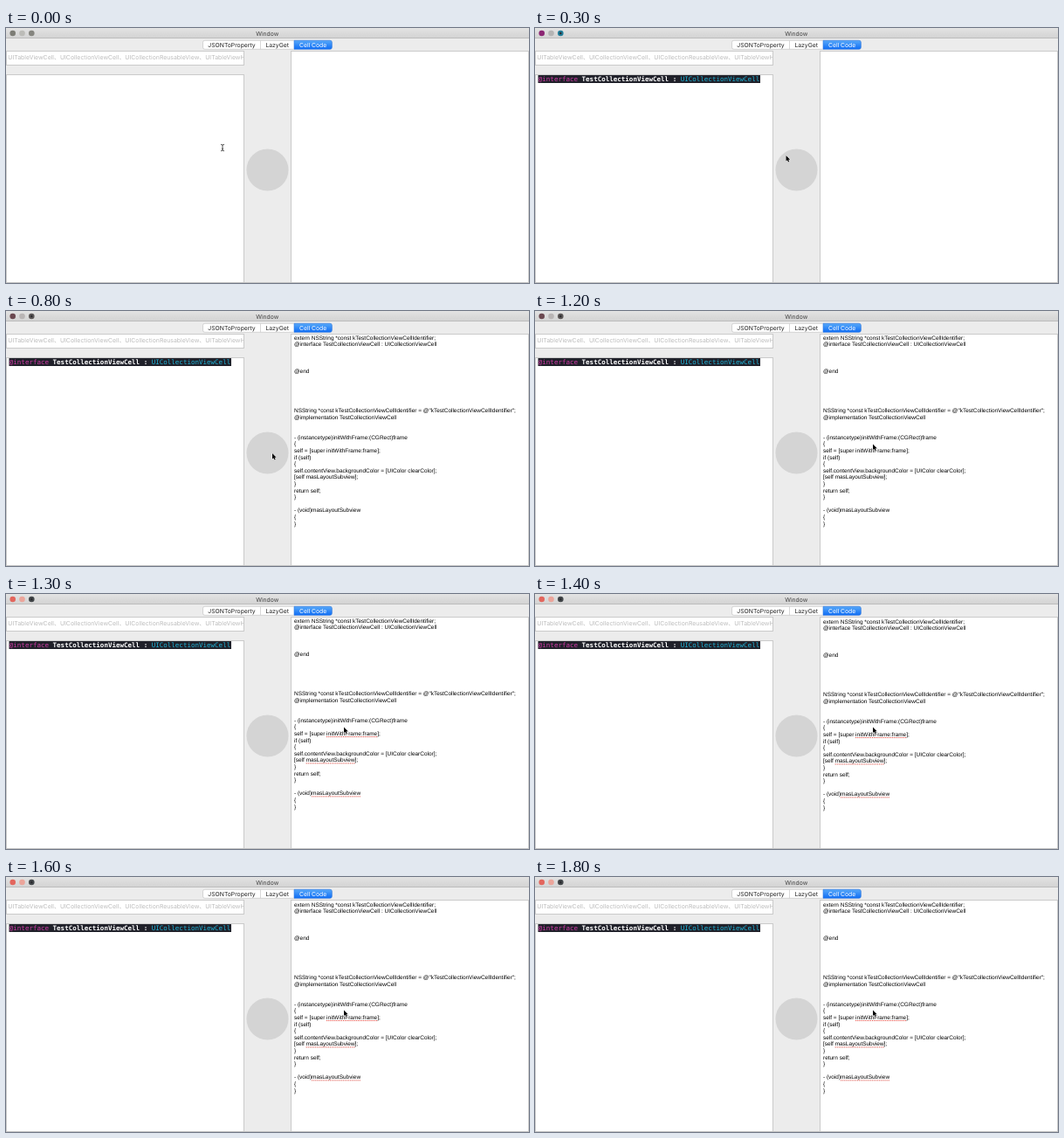
An HTML page with a canvas for the animation above (1.9 s loop, 599 by 292 pixels).

```html
<!DOCTYPE html>
<html>
<head>
<meta charset="utf-8">
<style>
html, body { margin: 0; width: 100%; height: 100%; overflow: hidden; background: #ececec; }
canvas { display: block; }
</style>
</head>
<body>
<canvas id="stage" width="599" height="292"></canvas>
<script>
const ctx = document.getElementById('stage').getContext('2d');
const LOOP = 1900, STEP = 100;
const UI_FAMILY = 'Inter, "Noto Sans CJK SC", sans-serif';
const UI = '6.8px ' + UI_FAMILY;
const HINT = '6.9px ' + UI_FAMILY;
const SANS = '6.46px "Liberation Sans", Arial, sans-serif';
const MONO = '7.53px "DejaVu Sans Mono", monospace';
const LINE = 7.6;
// Moments of the hard changes
const PASTE = 100, ARROW = 200, CONVERT = 700, CHECK = 1300, RELAYOUT = 1400;

const output = `extern NSString *const kTestCollectionViewCellIdentifier;
@interface TestCollectionViewCell : UICollectionViewCell



@end





NSString *const kTestCollectionViewCellIdentifier = @"kTestCollectionViewCellIdentifier";
@implementation TestCollectionViewCell


- (instancetype)initWithFrame:(CGRect)frame
{
self = [super initWithFrame:frame];
if (self)
{
self.contentView.backgroundColor = [UIColor clearColor];
[self masLayoutSubview];
}
return self;
}

- (void)masLayoutSubview
{
}`.split('\n');

const misspelled = ['initWithFrame:frame', 'masLayoutSubview'];

// Pointer tip: time, x, y
const path = [[0, 248, 137], [100, 250, 137], [200, 270, 139], [300, 287.5, 146],
  [400, 299, 157], [500, 305, 163], [800, 305, 163], [900, 323, 161], [1000, 352, 156],
  [1100, 377, 152.5], [1200, 387, 152.5], [1900, 387, 152.5]];

function rect(x, y, w, h, color) {
  ctx.fillStyle = color;
  ctx.fillRect(x, y, w, h);
}

function text(str, x, y, font, color, align = 'left') {
  ctx.font = font;
  ctx.fillStyle = color;
  ctx.textAlign = align;
  ctx.fillText(str, x, y);
}

function circle(x, y, r, color) {
  ctx.fillStyle = color;
  ctx.beginPath();
  ctx.arc(x, y, r, 0, Math.PI * 2);
  ctx.fill();
}

function gradient(y0, y1, from, to) {
  const g = ctx.createLinearGradient(0, y0, 0, y1);
  g.addColorStop(0, from);
  g.addColorStop(1, to);
  return g;
}

function box(x, y, w, h) {
  rect(x, y, w, h, '#cacaca');
  rect(x + 1, y + 1, w - 2, h - 2, '#fff');
}

function roundBox(x, y, w, h, radii, fill, stroke) {
  ctx.beginPath();
  ctx.roundRect(x, y, w, h, radii);
  ctx.fillStyle = fill;
  ctx.fill();
  ctx.strokeStyle = stroke;
  ctx.lineWidth = 0.6;
  ctx.stroke();
}

function drawTitleBar(t) {
  rect(0, 0, 599, 12, gradient(0, 12, '#e3e3e3', '#d2d2d2'));
  rect(0, 11, 599, 1, '#bcbcbc');
  const lights = t < PASTE ? ['#7d7d76', '#bcbcb8', '#85857f']
    : t < CONVERT ? ['#8c2674', '#b4b4b4', '#207c98']
    : t < CHECK ? ['#6b4850', '#b9b5b5', '#5b5656']
    : ['#e3665d', '#eba59b', '#43474a'];
  lights.forEach((color, i) => circle(7.7 + i * 10.8, 6, 3.3, color));
  if (t >= PASTE) circle(29.3, 6, 1.2, '#29292d');
  text('Window', 299.2, 8.6, UI, '#404040', 'center');
}

function drawTabs() {
  roundBox(225.5, 14.3, 147.8, 10, 2.2, '#fff', '#bdbdbd');
  rect(291, 14.5, 0.7, 9.6, '#c8c8c8');
  roundBox(330, 14.3, 43.3, 10, [0, 2.2, 2.2, 0], gradient(14, 24, '#5aabf9', '#126ff5'), '#2a78e4');
  text('JSONToProperty', 258.5, 21.8, UI, '#222', 'center');
  text('LazyGet', 310.7, 21.8, UI, '#222', 'center');
  text('Cell Code', 351.6, 21.8, UI, '#fff', 'center');
}

function drawPanels() {
  box(0, 26, 273, 17);
  box(0, 53, 273, 239);
  box(326, 26, 273, 266);
  ctx.save();
  ctx.beginPath();
  ctx.rect(1, 27, 271, 15);
  ctx.clip();
  text('UITableViewCell、UICollectionViewCell、UICollectionReusableView、UITableViewHeaderFooterView',
    2.3, 35.8, HINT, '#bcbcbc');
  ctx.restore();
  circle(299.5, 162.5, 24, '#d4d4d4');
}

function drawInput() {
  rect(3.5, 54, 254.5, 9, '#20212a');
  let x = 3.8;
  for (const [part, color, weight] of [
    ['@interface ', '#d03aa6', ''],
    ['TestCollectionViewCell : ', '#fff', 'bold '],
    ['UICollectionViewCell', '#1fb6da', '']]) {
    text(part, x, 61, weight + MONO, color);
    x += ctx.measureText(part).width;
  }
}

function underline(x, y, width) {
  ctx.strokeStyle = '#e0483f';
  ctx.lineWidth = 1;
  ctx.setLineDash([1.1, 1]);
  ctx.beginPath();
  ctx.moveTo(x, y);
  ctx.lineTo(x + width, y);
  ctx.stroke();
  ctx.setLineDash([]);
}

function drawOutput(t) {
  const left = 330, top = t < RELAYOUT ? 32.8 : 33.8;
  output.forEach((line, i) => {
    const y = top + i * LINE;
    text(line, left, y, SANS, '#000');
    const word = misspelled.find(w => line.includes(w));
    if (t < CHECK || !word) return;
    const before = line.slice(0, line.indexOf(word));
    underline(left + ctx.measureText(before).width, y + 1.5, ctx.measureText(word).width);
  });
}

function pointerAt(t) {
  const i = path.findIndex(p => p[0] > t);
  const [t0, x0, y0] = path[i - 1], [t1, x1, y1] = path[i];
  const k = (t - t0) / (t1 - t0);
  return [x0 + (x1 - x0) * k, y0 + (y1 - y0) * k];
}

function drawPointer(t) {
  ctx.save();
  ctx.translate(...pointerAt(t));
  ctx.lineJoin = 'round';
  if (t < ARROW) {
    ctx.strokeStyle = '#444';
    ctx.lineWidth = 0.9;
    ctx.stroke(new Path2D('M-2-3.7Q0-3.7 0-2.5Q0-3.7 2-3.7M0-2.8V3M-2 3.8Q0 3.8 0 2.6Q0 3.8 2 3.8M-1 1.2H1'));
  } else {
    const arrow = new Path2D('M0 0V6.6L1.5 5.2L2.5 7.5L3.7 7L2.7 4.7H4.7Z');
    ctx.strokeStyle = '#fff';
    ctx.lineWidth = 1;
    ctx.stroke(arrow);
    ctx.fillStyle = '#000';
    ctx.fill(arrow);
  }
  ctx.restore();
}

function draw(t) {
  rect(0, 0, 599, 292, '#ececec');
  drawTitleBar(t);
  drawTabs();
  drawPanels();
  if (t >= PASTE) drawInput();
  if (t >= CONVERT) drawOutput(t);
  rect(0, 291, 599, 1, '#c4c4c4');
  drawPointer(t);
}

ctx.textRendering = 'geometricPrecision';
const origin = performance.now();
function tick() {
  const t = Math.max(0, performance.now() - origin) % LOOP;
  draw(Math.floor(t / STEP) * STEP);
  requestAnimationFrame(tick);
}
tick();
</script>
</body>
</html>
```
